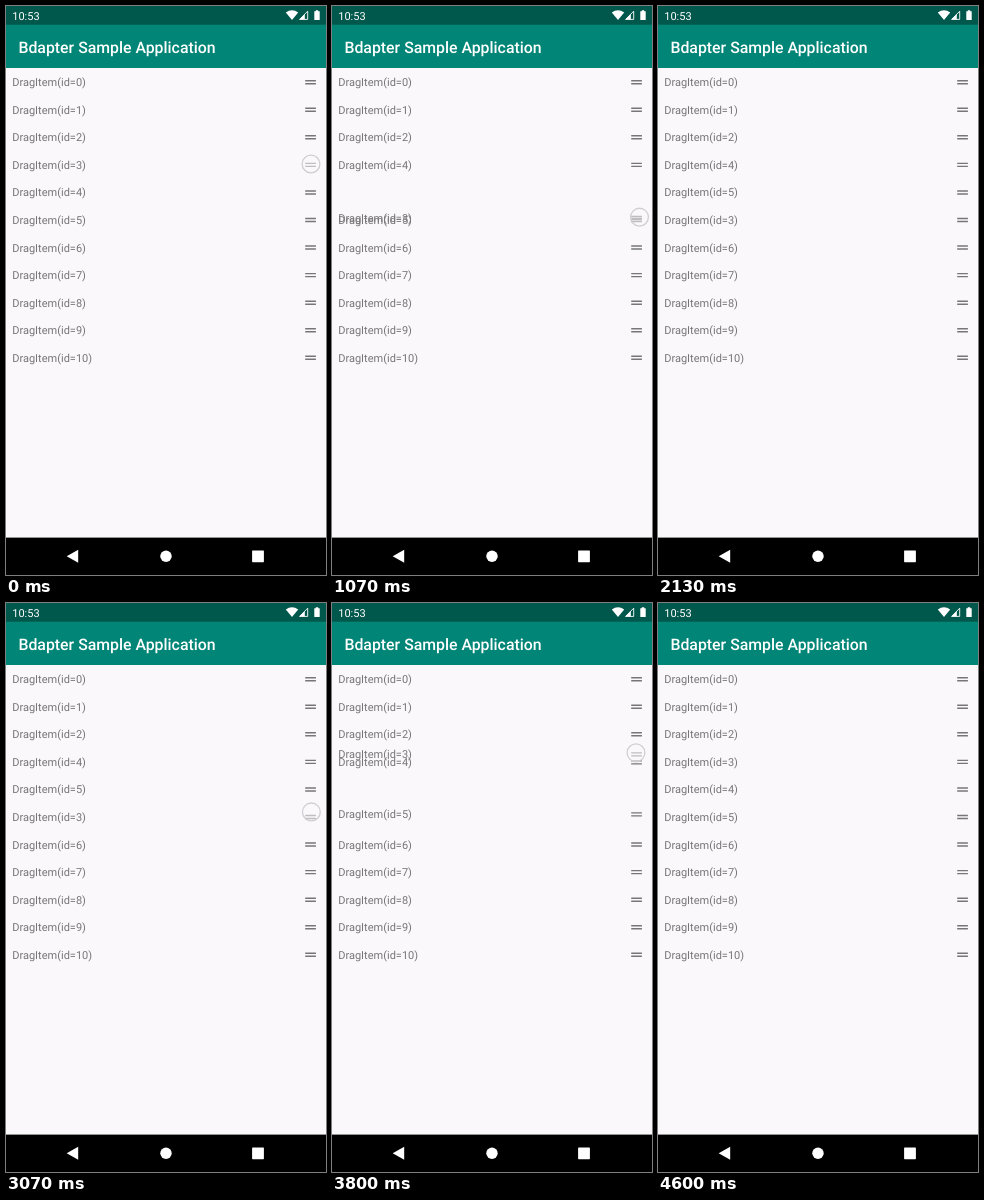
Animation of 320x569 px, one loop 4670 ms. Source, as an HTML page:

```html
<!DOCTYPE html>
<html lang="en">
<head>
<meta charset="utf-8">
<title>Drag to reorder</title>
<style>
  html, body { margin: 0; width: 100%; height: 100%; overflow: hidden; background: #faf8fb; }
  svg { display: block; width: 100%; height: 100%; font: 11.02px Roboto, sans-serif; }
  .title { font-size: 15.85px; font-weight: 500; }
  .row { fill: #777578; }
</style>
</head>
<body>
<svg viewBox="0 0 320 569" text-rendering="geometricPrecision">
  <rect width="320" height="569" fill="#faf8fb"/>
  <rect width="320" height="62" fill="#008577"/>
  <rect width="320" height="18.7" fill="#00574b"/>
  <g fill="#fff">
    <text x="6.2" y="13.6">10:53</text>
    <text class="title" x="12.4" y="46.6">Bdapter Sample Application</text>
    <path d="M286 14 279.8 6.5Q286 1.9 292.2 6.5Z"/>
    <path d="M301.7 5.2V13.4H293.6Z" fill="none" stroke="#fff" stroke-width=".9"/>
    <path d="M298.8 8V13.5H293.4Z"/>
    <path d="M309.8 4.2h2.4v1h1.5v8.9h-5.4V5.2h1.5z"/>
  </g>
  <g id="rows"></g>
  <circle id="touch" r="8.9" fill="#faf8fb" fill-opacity=".55" stroke="#cfced3" stroke-width="1.3"/>
  <rect y="531.6" width="320" height="37.4"/>
  <g fill="#fff">
    <path d="M60.7 550.3 72.2 543.8V556.8Z"/>
    <circle cx="160" cy="550.3" r="5.7"/>
    <rect x="246.1" y="544.4" width="11.8" height="11.8" rx=".6"/>
  </g>
</svg>
<script>
  const LOOP = 4670, FRAMES = 70, STEP = LOOP / FRAMES;
  const PITCH = 27.56, MOVE = 250, FADE = 200, SLOP = 5, SWAP_DELAY = 27, DRAGGED = 3;

  // travel: [time, distance dragged] along the direction of the gesture.
  const down = { dir: 1, slot: 3, x: 305, drift: 2.5, y: 158, release: 1815,
    travel: [[230, 0], [734, 42], [1400, 64.3]] };
  const up = { dir: -1, slot: 5, x: 305.5, drift: -1.5, y: 212.5, release: 4310, start: 2595,
    travel: [[2870, 0], [3068, 3.5], [3330, 26.5], [3575, 27.5], [3810, 63.8]] };

  const clamp = v => Math.min(1, Math.max(0, v));
  const ease = v => (1 - Math.cos(Math.PI * clamp(v))) / 2;

  function lerpKeys(keys, at) {
    const i = keys.findIndex(key => key[0] > at);
    if (i === 0) return keys[0][1];
    if (i < 0) return keys.at(-1)[1];
    const [a, from] = keys[i - 1], [b, to] = keys[i];
    return from + (to - from) * (at - a) / (b - a);
  }

  // A neighbour starts to give way shortly after the dragged row reaches its slot.
  function swapTime({ travel, dir, slot }, id) {
    const target = dir > 0 ? id : id - 1;
    const inverse = travel.map(([time, distance]) => [distance, time]);
    return lerpKeys(inverse, Math.abs(target - slot) * PITCH) + SWAP_DELAY;
  }

  const rows = Array.from({ length: 11 }, (_, id) => {
    const row = document.createElementNS("http://www.w3.org/2000/svg", "g");
    row.setAttribute("class", "row");
    row.innerHTML = `<text x="6.2" y="80.2">DragItem(id=${id})</text>
      <path d="M299.2 74h10.7v1.4h-10.7zM299.2 77h10.7v1.4h-10.7z"/>`;
    document.getElementById("rows").append(row);
    return row;
  });
  const touch = document.getElementById("touch");

  function draggedSlot({ slot, dir, release }, distance, t) {
    const held = slot + (distance > SLOP ? dir * distance / PITCH : 0);
    return held + (slot + dir * 2 - held) * ease((t - release) / MOVE);
  }

  function neighbourSlot(id, t) {
    if (id !== 4 && id !== 5) return id;
    const shift = gesture => ease((t - swapTime(gesture, id)) / MOVE);
    return id - shift(down) + shift(up);
  }

  function draw(t) {
    const gesture = t < up.start ? down : up;
    const distance = lerpKeys(gesture.travel, t);
    touch.setAttribute("cx", gesture.x + gesture.drift * clamp(distance / 42));
    touch.setAttribute("cy", gesture.y + gesture.dir * distance);
    touch.setAttribute("opacity", 1 - clamp((t - gesture.release) / FADE));
    rows.forEach((row, id) => {
      const slot = id === DRAGGED ? draggedSlot(gesture, distance, t) : neighbourSlot(id, t);
      row.setAttribute("transform", `translate(0 ${slot * PITCH})`);
    });
  }

  function tick() {
    const t = performance.now() % LOOP;
    draw(Math.floor((t + 5) / STEP) % FRAMES * STEP);
    requestAnimationFrame(tick);
  }
  tick();
</script>
</body>
</html>
```
